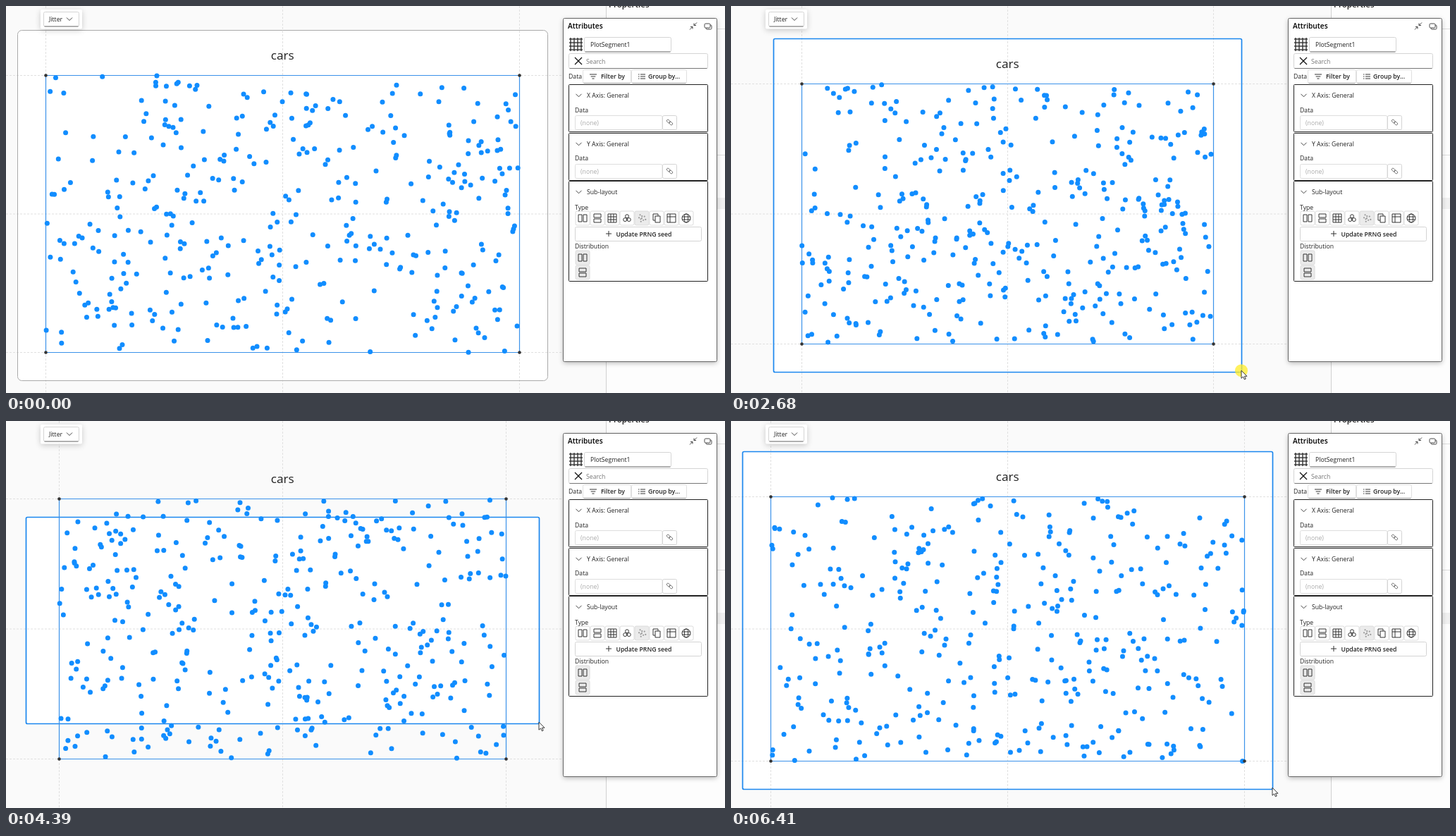
Recreate the animation shown at these times as an HTML page with a canvas. Size 1020 by 549 pixels, loop 8000 ms.

```html
<!DOCTYPE html>
<html lang="en">
<head>
<meta charset="utf-8">
<title>Jitter plot resize</title>
<style>
html, body { margin: 0; width: 100%; height: 100%; overflow: hidden; background: #fafafa; }
canvas, svg { position: absolute; left: 0; top: 0; width: 1020px; height: 549px; display: block; }
text { font: 8.7px "Open Sans", "Noto Sans", sans-serif; fill: #222; }
.b { font-weight: 600; }
.dim { fill: #777; }
.none { fill: #aaa; }
</style>
</head>
<body>
<canvas id="stage"></canvas>
<svg viewBox="0 0 1020 549">
  <text id="title" x="392.3" y="75" text-anchor="middle" style="font-size:17.2px">cars</text>
  <text x="61" y="22">Jitter</text>
  <text class="b" x="855" y="2" style="font-size:11.5px">Properties</text>
  <text class="b" x="797" y="32" style="font-size:10.2px;fill:#000">Attributes</text>
  <text x="829" y="58">PlotSegment1</text>
  <text class="dim" x="823" y="82">Search</text>
  <text x="798" y="103">Data</text>
  <text class="b" x="844" y="103">Filter by</text>
  <text class="b" x="911" y="103">Group by...</text>
  <text x="824" y="130">X Axis: General</text>
  <text x="807" y="151">Data</text>
  <text class="none" x="815" y="169">(none)</text>
  <text x="824" y="199">Y Axis: General</text>
  <text x="807" y="219">Data</text>
  <text class="none" x="815" y="238">(none)</text>
  <text x="824" y="267">Sub-layout</text>
  <text x="807" y="289">Type</text>
  <text class="b" x="865.5" y="327">Update PRNG seed</text>
  <text x="807" y="344">Distribution</text>
</svg>
<script>
const W = 1020, H = 549, LOOP = 8000;
const CX = 392.5, CY = 283;          // chart centre, fixed while resizing
const INSET = 40, HEAD = 64;         // plot margins inside the chart
const ENTER = 70, SETTLE = 1300, HOVER = 780;
const REACT = 70, RELEASE = 100, RELAYOUT = 135;

const canvas = document.getElementById('stage');
const title = document.getElementById('title');
const g = canvas.getContext('2d');
const dpr = window.devicePixelRatio || 1;
canvas.width = W * dpr;
canvas.height = H * dpr;

const mix = (a, b, k) => a + (b - a) * k;
const progress = (t, from, span) => Math.min(1, Math.max(0, (t - from) / span));
const smooth = k => k * k * (3 - 2 * k);
const overshoot = k => 1 + 2.6 * (k - 1) ** 3 + 1.6 * (k - 1) ** 2;

// w and h are half sizes of the chart; bow bends the drag path sideways
const FIRST = { w: 376, h: 248.5 };
const DRAGS = [
  { press: 1470, span: 240, commit: 2190, w: 332, h: 236.5, ease: overshoot, bow: 0 },
  { press: 2680, span: 200, commit: 3330, w: 357, h: 236.5, ease: smooth, bow: 0 },
  { press: 3790, span: 430, commit: 4390, w: 364, h: 146.5, ease: smooth, bow: 0 },
  { press: 4980, span: 450, commit: 5820, w: 376, h: 239.5, ease: smooth, bow: -25 }
];
const SIZES = [FIRST, ...DRAGS];

function dragged(t) {
  const n = DRAGS.filter(d => d.press <= t).length;
  if (!n) return FIRST;
  const from = SIZES[n - 1], d = SIZES[n];
  const k = d.ease(progress(t, d.press + REACT, d.span));
  return { w: mix(from.w, d.w, k) + d.bow * Math.sin(Math.PI * k), h: mix(from.h, d.h, k) };
}

function scatter(seed) {
  const rnd = () => {
    seed = (seed + 0x6D2B79F5) | 0;
    let n = Math.imul(seed ^ (seed >>> 15), 1 | seed);
    n = (n + Math.imul(n ^ (n >>> 7), 61 | n)) ^ n;
    return ((n ^ (n >>> 14)) >>> 0) / 4294967296;
  };
  return Array.from({ length: 375 }, () => [rnd(), rnd()]);
}
const CLOUDS = SIZES.map((s, i) => scatter(41 + i * 977));

function line(color, width, x1, y1, x2, y2) {
  g.strokeStyle = color;
  g.lineWidth = width;
  g.beginPath();
  g.moveTo(x1, y1);
  g.lineTo(x2, y2);
  g.stroke();
}

function dot(x, y, r, fill) {
  g.fillStyle = fill;
  g.beginPath();
  g.arc(x, y, r, 0, 7);
  g.fill();
}

function box(x, y, w, h, r, fill, stroke, width = 1) {
  g.beginPath();
  g.roundRect(x, y, w, h, r);
  if (fill) { g.fillStyle = fill; g.fill(); }
  if (stroke) { g.strokeStyle = stroke; g.lineWidth = width; g.stroke(); }
}

function centred(s, r, fill, stroke, width) {
  box(CX - s.w, CY - s.h, s.w * 2, s.h * 2, r, fill, stroke, width);
}

function raised(blur, alpha, draw) {
  g.save();
  g.shadowColor = `rgba(0,0,0,${alpha})`;
  g.shadowBlur = blur * dpr;
  g.shadowOffsetY = 2 * dpr;
  draw();
  g.restore();
}

function field(x, y, w, h) {
  box(x, y, w, h, 2, '#fff', '#d4d4d4');
  line('#777', 1, x + 1, y + h, x + w - 1, y + h);
}

function chevron(x, y) {
  line('#444', 1, x - 4, y - 2, x, y + 2);
  line('#444', 1, x, y + 2, x + 4, y - 2);
}

// Evenly spaced grid lines around the origin
function lattice(n, gap, reach, width = 1) {
  for (let i = 0; i < n; i++) {
    const p = (i - (n - 1) / 2) * gap;
    line(C, width, p, -reach, p, reach);
    line(C, width, -reach, p, reach, p);
  }
}

// Small icons, each drawn around the origin
const C = '#333';
const ICONS = {
  columns() { for (const x of [-6, 1]) box(x, -5, 5, 10, 0, '', C); },
  rows() { for (const y of [-6, 1]) box(-5, y, 10, 5, 0, '', C); },
  table() { box(-6, -6, 12, 12, 0, '', C); lattice(2, 4, 6); },
  packing() {
    for (let i = 0; i < 3; i++) {
      const a = (i * 4 - 3) * Math.PI / 6;
      box(3.2 * Math.cos(a) - 2.5, 3.2 * Math.sin(a) - 2, 5, 5, 2.5, '', C);
    }
  },
  jitter() { for (let i = 0; i < 9; i++) dot(2 * Math.sqrt(i) * Math.cos(i * 2.4), 2 * Math.sqrt(i) * Math.sin(i * 2.4), 1.1, '#999'); },
  overlap() { box(-5, -6, 7, 9, 0, '', C); box(-2, -3, 7, 9, 0, '#fff', C); },
  treemap() { box(-6, -6, 12, 12, 0, '', C); line(C, 1, -6, -2, 6, -2); line(C, 1, -2, -6, -2, 6); },
  globe() {
    box(-6, -6, 12, 12, 6, '', C);
    box(-2.6, -6, 5.2, 12, [3], '', C);
    for (const y of [-2, 2]) line(C, 1, -6, y, 6, y);
  },
  link() { g.rotate(0.7); for (const x of [-5, -0.5]) box(x, -1.7, 5.5, 3.4, 1.7, '', '#666', 0.8); },
  cross() { for (const s of [-1, 1]) line('#111', 1.3, -5, -5 * s, 5, 5 * s); },
  plus() { lattice(1, 0, 4); },
  grid() { lattice(4, 5, 9.5, 1.4); },
  filter() { for (let i = 0; i < 3; i++) line(C, 1, i * 1.7 - 5, i * 3 - 3, 5 - i * 1.7, i * 3 - 3); },
  group() {
    for (const y of [-3, 0, 3]) { line(C, 1, -2, y, 5, y); line(C, 1, -5, y, -3.5, y); }
  },
  shrink() {
    for (const s of [-1, 1]) {
      line(C, 0.9, 5 * s, -5 * s, s, -s);
      line(C, 0.9, s, -4 * s, s, -s);
      line(C, 0.9, s, -s, 4 * s, -s);
    }
  },
  windows() { for (const p of [-2, -4]) box(p - 1, p, 8, 6, 1.5, '#fff', C, 0.9); }
};

function icon(name, x, y) {
  g.save();
  g.translate(x, y);
  ICONS[name]();
  g.restore();
}

function iconButton(name, x, y, active) {
  box(x - 10, y - 10, 20, 20, 2, active ? '#ebebeb' : '#fff', '#dcdcdc');
  icon(name, x, y);
}

function textButton(name, x, w) {
  box(x, 90.5, w, 19, 2, '#fff', '#e0e0e0');
  line('#999', 1, x + 1, 109.5, x + w - 1, 109.5);
  icon(name, x + 14.5, 100);
}

function section(y, h) {
  box(798.5, y, 197, h, 1, '', '#222');
  chevron(812.5, y + 15.3);
}

function drawBackPane() {
  g.fillStyle = '#fdfdfd';
  g.fillRect(851, 0, W - 851, H);
  line('#d0d0d0', 1, 851.5, 0, 851.5, H);
  for (const y of [32.5, 211.5]) line('#ddd', 1, 1008, y, W, y);
  g.fillStyle = '#f0f0f0';
  g.fillRect(1008, 272, 12, 16);
}

function drawPanel() {
  raised(7, 0.28, () => box(790.5, 17.5, 218, 487, 2, '#fff'));
  box(790.5, 17.5, 218, 487, 2, '#fff', '#666');
  icon('shrink', 975, 28.5);
  icon('windows', 996, 29);
  icon('grid', 808.5, 54.5);
  field(820.5, 44.5, 123, 20.5);
  field(798.5, 67.5, 197, 21);
  icon('cross', 812, 78);
  textButton('filter', 818.5, 68);
  textButton('group', 887.5, 78);

  for (const y of [111.5, 180.5]) {
    section(y, 67);
    box(807.5, y + 44, 123.5, 20, 2, '#fff', '#dedede');
    box(931.5, y + 44, 20, 20, 2, '#fff', '#d4d4d4');
    icon('link', 941.5, y + 53.5);
  }
  section(248.5, 142);
  ['columns', 'rows', 'table', 'packing', 'jitter', 'overlap', 'treemap', 'globe']
    .forEach((name, i) => iconButton(name, 818 + i * 21, 301, name === 'jitter'));
  box(807.5, 313.5, 179, 20, 2, '#fff', '#d4d4d4');
  icon('plus', 855, 323);
  iconButton('columns', 818, 357, true);
  iconButton('rows', 818, 378, true);
}

function drawToolbar() {
  raised(9, 0.2, () => box(49, 5, 59, 27.5, 2, '#fff'));
  field(53.5, 8.5, 50, 20.5);
  chevron(90, 18.5);
}

function drawGuides(p) {
  g.setLineDash([3, 2]);
  for (const x of [p.l, CX, p.r]) line('#e0e0e0', 1, x, 0, x, H);
  for (const y of [p.t, (p.t + p.b) / 2, p.b]) line('#e0e0e0', 1, 0, y, 791, y);
  g.setLineDash([]);
}

function drawPlot(p, cloud) {
  box(p.l, p.t, p.r - p.l, p.b - p.t, 0, '', '#3b92ea', 1.2);
  for (const [u, v] of cloud) dot(mix(p.l, p.r, u), mix(p.t, p.b, v), 3.5, '#118dff');
  for (const x of [p.l, p.r]) for (const y of [p.t, p.b]) dot(x, y, 2.3, '#333');
}

const ARROW = new Path2D('M0 0V11L2.6 8.7L4.4 12.6L6.2 11.8L4.5 8H8Z');

function drawPointer(t, size) {
  if (t < ENTER) return;
  const k = overshoot(progress(t, ENTER, SETTLE - ENTER));
  const x = mix(916, CX + size.w - 0.5, k), y = mix(541, CY + size.h - 2.3, k);
  if (DRAGS.some(d => t >= d.press && t < d.commit - RELEASE)) dot(x, y, 9, 'rgba(255,236,40,0.75)');
  g.save();
  g.translate(x, y);
  g.fillStyle = '#fff';
  g.fill(ARROW);
  g.strokeStyle = '#222';
  g.lineWidth = 0.9;
  g.stroke(ARROW);
  g.restore();
}

function render(t) {
  g.setTransform(dpr, 0, 0, dpr, 0, 0);
  g.fillStyle = '#fafafa';
  g.fillRect(0, 0, W, H);

  const chart = SIZES[DRAGS.filter(d => d.commit <= t).length];
  const n = DRAGS.filter(d => d.commit + RELAYOUT <= t).length;
  const { w, h } = SIZES[n];
  const plot = { l: CX - w + INSET, r: CX + w - INSET, t: CY - h + HEAD, b: CY + h - INSET };
  const size = dragged(t), hot = t >= HOVER;

  centred(chart, hot ? 2 : 6, '#fff');
  drawGuides(plot);
  centred(chart, hot ? 2 : 6, '', hot ? '#1a86ee' : '#aaa', hot ? 1.7 : 1);
  drawPlot(plot, CLOUDS[n]);
  title.setAttribute('y', plot.t - 23);

  if (DRAGS.some(d => t >= d.press + REACT && t < d.commit)) centred(size, 0, '', '#f6c070', 1.2);
  drawToolbar();
  drawBackPane();
  drawPanel();
  drawPointer(t, size);
}

const start = performance.now();
function tick() {
  render((performance.now() - start) % LOOP);
  requestAnimationFrame(tick);
}
tick();
</script>
</body>
</html>
```
